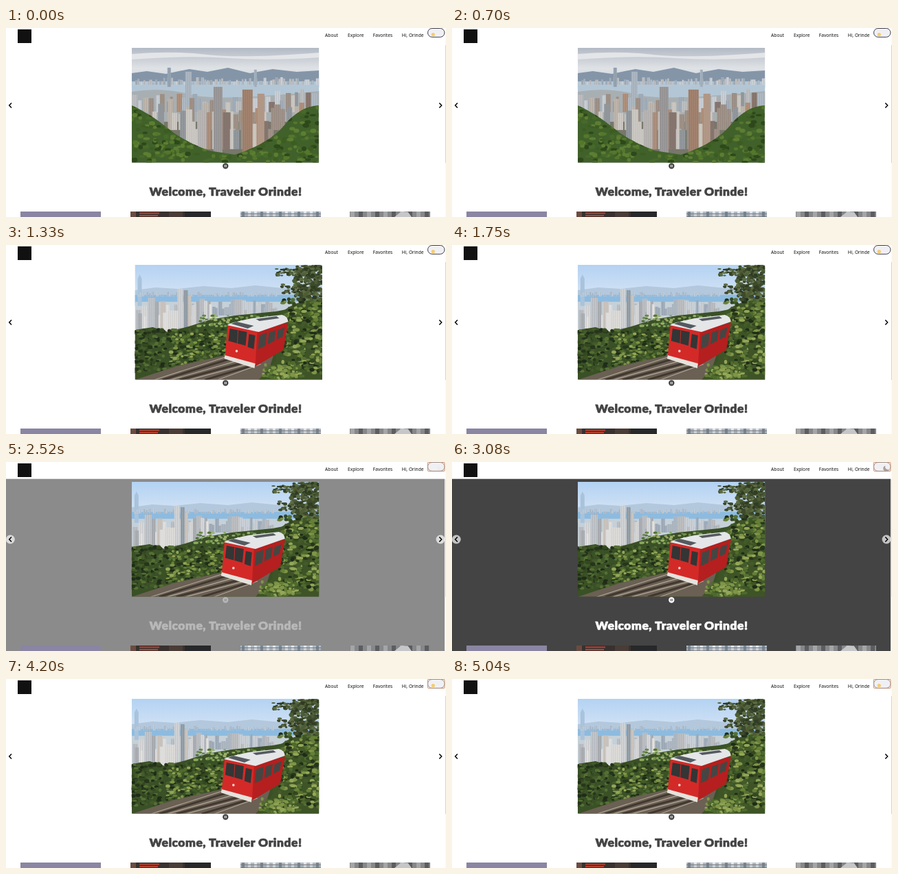
An HTML page for the animation above (5110 ms loop, 640 by 276 pixels).

```html
<!DOCTYPE html>
<html lang="en">
<head>
<meta charset="utf-8">
<title>Travel carousel</title>
<style>
  html, body { margin: 0; height: 100%; overflow: hidden; background: #fff; }
  svg { display: block; width: 100vw; height: 100vh; --bg: #fff; --fg: #444; }
  .bg { fill: var(--bg); }
  .fg { fill: var(--fg); }
  .nav { font: 6.7px "Noto Sans", "Open Sans", sans-serif; fill: #111; }
  .title {
    font: 900 17.4px Lato, sans-serif; letter-spacing: .56px; text-anchor: middle;
    fill: var(--fg); stroke: var(--fg); stroke-width: .7; stroke-linejoin: round;
  }
  .chevron { fill: none; stroke: #000; stroke-width: 1.5; }
</style>
</head>
<body>
<svg viewBox="0 0 640 276" preserveAspectRatio="none">
  <defs>
    <clipPath id="page"><rect width="638" height="276"/></clipPath>
    <clipPath id="frame"><rect width="272.4" height="167.6"/></clipPath>
    <clipPath id="hill"><path d="M0 84Q28 97 52 117T112 150L150 156Q200 140 222 113T272 84V168H0Z"/></clipPath>
    <linearGradient id="cloud" x2="0" y2="1">
      <stop stop-color="#b3bac5"/><stop offset=".18" stop-color="#dfe2e5"/><stop offset=".3" stop-color="#c9d3dd"/>
    </linearGradient>
    <linearGradient id="sky" x2="0" y2="1">
      <stop stop-color="#b3d2f3"/><stop offset="1" stop-color="#dfe9f4"/>
    </linearGradient>
    <pattern id="floors" width="3" height="2" patternUnits="userSpaceOnUse">
      <path d="M0 .5H3M.5 0V2" stroke="#334" stroke-opacity=".2" stroke-width=".6"/>
    </pattern>
  </defs>

  <rect class="bg" width="640" height="276"/>
  <g clip-path="url(#page)">
    <g id="track">
      <g id="city" transform="translate(182.8 28.9)" clip-path="url(#frame)"></g>
      <g id="tram" transform="translate(820.8 28.9)" clip-path="url(#frame)"></g>
    </g>
  </g>

  <g fill="#fff" fill-opacity=".68"><circle cx="6.3" cy="113" r="6.5"/><circle cx="632" cy="113" r="6.5"/></g>
  <path class="chevron" d="M8 109.6L4.7 113L8 116.4M630.3 109.6L633.6 113L630.3 116.4"/>

  <circle class="fg" cx="319.3" cy="201.5" r="4.2"/>
  <path class="bg" d="M317.8 199.8h1v3.4h-1zM319.8 199.8h1v3.4h-1z"/>
  <text class="title" x="319.6" y="244.5">Welcome, Traveler Orinde!</text>
  <g id="cards"></g>

  <rect width="640" height="24.7" fill="#fff"/>
  <rect x="638" width="2" height="276" fill="#fbfbfb"/>
  <rect x="639" y="25" width="1" height="172" fill="#d6d6d6"/>
  <rect x="17" y="2" width="20" height="20" fill="#111"/>
  <g class="nav">
    <text x="464" y="13">About</text>
    <text x="497" y="13">Explore</text>
    <text x="533.7" y="13">Favorites</text>
    <text x="575.7" y="13">Hi, Orinde</text>
  </g>
  <rect id="focus" x="613.4" y=".4" width="24.6" height="13" rx="1" fill="#f7ede6" stroke="#c47a4e" stroke-width=".8"/>
  <rect id="pill" x="613.5" y=".5" width="24.4" height="12.8" rx="6.4" fill="#f0f0f4" stroke-width=".9"/>
  <circle id="sun" cx="621.3" cy="9.5" r="2.6" fill="#f3cd72"/>
  <path id="moon" d="M630.6 5.4A4 4 0 1 0 635 10.6A3.6 3.6 0 0 1 630.6 5.4Z" fill="#a99f96"/>
</svg>

<script>
const LOOP = 5110, STEP = 70, SLIDE = 638;
const el = id => document.getElementById(id);

let seed = 29;
const rand = (a, b) => a + (b - a) * ((seed = seed * 16807 % 2147483647) / 2147483647);
const pick = list => list[Math.floor(rand(0, list.length))];
const rect = (x, y, w, h, fill) => `<rect x="${x}" y="${y}" width="${w}" height="${h}" fill="${fill}"/>`;
const shape = (d, fill) => `<path d="${d}" fill="${fill}"/>`;
const line = (d, stroke, width) => `<path d="${d}" fill="none" stroke="${stroke}" stroke-width="${width}"/>`;
const repeat = (n, make) => Array.from({ length: n }, (_, i) => make(i)).join('');

const tower = (x, y, w, h, fill) => rect(x, y, w, h, fill) + rect(x, y, w, h, 'url(#floors)');
const towers = (n, x0, x1, base, h0, h1, w0, w1, colors) => repeat(n, i => {
  const h = rand(h0, h1);
  return tower(x0 + (x1 - x0) * (i + rand(0, .7)) / n, base - h, rand(w0, w1), h, pick(colors));
});
const leaves = (n, x0, x1, y0, y1, r, colors) => repeat(n, () =>
  `<ellipse cx="${rand(x0, x1)}" cy="${rand(y0, y1)}" rx="${rand(r / 2, r)}" ry="${rand(r / 3, r * .7)}" fill="${pick(colors)}"/>`);

const haze = ['#b8c3cd', '#d5dbe0', '#a9b7c3', '#c7c9ca'];
const stone = ['#c9c0b4', '#a8998c', '#8d7c72', '#d8d4cd', '#9aa0a3', '#b8977f'];
const green = ['#3c5d22', '#54772c', '#47692a', '#2d481a', '#5d7d33'];

el('city').innerHTML =
  rect(0, 0, 273, 168, 'url(#cloud)') +
  shape('M0 9Q60 4 110 10T273 7V14Q200 19 140 15T0 17Z', '#e4e5e8') +
  shape('M0 37L22 34L50 38L84 31L110 35L140 29L172 37L205 31L240 35L273 33V58H0Z', '#8495a8') +
  rect(0, 49, 273, 40, '#b3c6d5') +
  towers(65, 0, 270, 54, 3, 11, 2, 5, haze) +
  tower(52, 29, 5, 28, '#9eacba') + tower(178, 32, 4, 25, '#aebbc7') +
  shape('M0 64Q45 57 85 68T273 63V110H0Z', '#a8afb2') +
  rect(0, 108, 273, 60, '#77776a') +
  towers(34, 0, 268, 94, 14, 34, 4, 9, haze.concat(stone)) +
  tower(78, 35, 9, 55, '#b5c1cb') +
  towers(26, 20, 250, 120, 22, 48, 6, 10, stone) +
  towers(17, 66, 205, 148, 28, 60, 7, 11, stone) +
  tower(119, 57, 13, 97, '#a3a09f') + tower(161, 61, 15, 98, '#a98872') +
  tower(183, 67, 10, 80, '#bea18c') + tower(96, 91, 13, 56, '#c2bfbb') +
  `<g clip-path="url(#hill)">${rect(0, 80, 273, 88, '#41612a') + leaves(420, 0, 273, 82, 168, 5, green)}</g>`;

const shade = ['#26351b', '#33481f', '#435a2b', '#1f2c17', '#557034'];
const bough = ['#3d4a2b', '#4d5c35', '#2f3b22', '#5d6b42'];
const sunny = ['#7f9547', '#94a658', '#667f38', '#4f6a2d'];
el('tram').innerHTML =
  rect(0, 0, 273, 60, 'url(#sky)') +
  shape('M0 37L30 33L62 35L100 31L140 34L175 30L215 34L273 31V60H0Z', '#b3c8dc') +
  rect(0, 44, 273, 12, '#8dbbe0') +
  rect(0, 54, 273, 40, '#c5d0d8') +
  shape('M4 60V20L7 14L10 20V60Z', '#a9c3dc') +
  towers(42, 0, 205, 46, 2, 7, 2, 4, ['#c9d6e2', '#b9c9d8']) +
  towers(32, 80, 205, 74, 8, 24, 3, 7, haze) +
  towers(28, 0, 112, 98, 22, 54, 4, 8, ['#e3e4e3', '#c7cbce', '#b5b9bc', '#d8d1c8', '#f0efec']) +
  tower(62, 35, 8, 57, '#dcdedf') + tower(71, 37, 6, 55, '#9da8b1') +
  tower(19, 48, 10, 46, '#cbd0d4') + tower(48, 67, 15, 28, '#e9e8e4') +
  shape('M0 95L26 91L48 98L78 90L110 80L145 74L205 68L273 55V168H0Z', '#3a5026') +
  leaves(420, 0, 140, 94, 158, 4, shade) +
  leaves(110, 50, 135, 100, 150, 3.5, sunny) +
  leaves(90, 92, 205, 74, 90, 3, ['#71924b', '#86a65a', '#52733a', '#9db06a']) +
  shape('M0 168L60 148L132 132L205 122L190 168H0Z', '#6a6053') +
  line('M28 168L137 133M52 168L150 140M79 168L165 145M120 168L183 145', '#b5aa9c', 1.1) +
  line('M40 168L143 136M65 168L158 143M102 168L175 146', '#40372f', 3) +
  shape('M205 78Q228 50 273 50V168H180L205 140Z', '#3e5426') +
  leaves(300, 215, 273, 50, 164, 4.5, shade.concat(sunny)) +
  leaves(210, 232, 273, 2, 52, 4, bough) +
  leaves(60, 205, 248, 6, 16, 3, bough) +
  leaves(35, 212, 250, 28, 42, 3, bough) +
  leaves(70, 184, 240, 146, 168, 4, sunny) +
  // tram: side, front, roof, glazing, bumper
  shape('M176 97L223 84L216 124L174 149Z', '#b51f1f') +
  shape('M135 88L178 97L175 149L131 134Z', '#d32a28') +
  shape('M134 88Q140 84 170 78L214 73Q222 75 223 83L180 98Z', '#e4e6e8') +
  shape('M140 86L164 93L173 89L148 83ZM176 79L206 75L210 78L181 82Z', '#555b60') +
  shape('M138 93L163 98L161 118L136 111ZM166 101L175 103L173 123L164 120Z', '#343535') +
  shape('M181 103L192 99L190 118L179 123ZM195 99L205 95L203 111L193 116ZM208 95L218 91L215 105L206 109Z', '#454643') +
  line('M150 96L149 115', '#d32a28', .9) +
  shape('M131 132L175 144L174 151L130 137Z', '#e6e2dc') +
  '<circle cx="148" cy="126" r="1.8" fill="#f0d9cc"/>';

el('cards').innerHTML =
  rect(21, 268, 117, 8, '#8a85a2') +
  rect(181, 268, 117, 8, '#39312f') + rect(181, 268, 8, 8, '#6b4b40') + rect(237, 268, 20, 8, '#4a3c36') +
  line('M194 270.5H223M194 274H221', '#b8402f', 2.2) + rect(260, 268, 38, 8, '#262829') +
  rect(341, 268, 117, 8, '#aeb9c4') +
  repeat(13, i => rect(343 + i * 9, 268, 4, 8, i % 3 ? '#e0e2e4' : '#7a8792')) +
  line('M341 271.5H458M341 275H458', '#6f7176', 1) +
  rect(500, 268, 117, 8, '#858789') +
  repeat(10, i => rect(501 + i * 12, 268, 6, 8, i % 2 ? '#5b5d61' : '#a3a5a7')) +
  shape('M565 276L575 268L585 269L590 276Z', '#c5c6c7');

// Same curve as CSS cubic-bezier(), solved by bisection.
const bezier = (x1, y1, x2, y2) => x => {
  if (x <= 0) return 0;
  if (x >= 1) return 1;
  const at = (s, a, b) => 3 * s * (1 - s) ** 2 * a + 3 * s * s * (1 - s) * b + s ** 3;
  let lo = 0, hi = 1;
  for (let i = 0; i < 24; i++) {
    const mid = (lo + hi) / 2;
    at(mid, x1, x2) < x ? lo = mid : hi = mid;
  }
  return at(lo, y1, y2);
};
const ease = bezier(.25, .1, .25, 1);
const easeInOut = bezier(.42, 0, .58, 1);
const gray = v => `rgb(${v},${v},${v})`;
const svg = document.querySelector('svg');

function draw(now) {
  const t = Math.floor(now % LOOP / STEP) * STEP;
  const shift = SLIDE * easeInOut((t - 720) / 650);
  const dark = ease((t - 2340) / 500) - ease((t - 3635) / 500);
  const focused = t >= 2310;

  el('track').setAttribute('transform', `translate(${-shift} 0)`);
  svg.style.setProperty('--bg', gray(Math.round(255 - 187 * dark)));
  svg.style.setProperty('--fg', gray(Math.round(68 + 187 * dark)));
  el('focus').style.opacity = focused ? 1 : 0;
  el('pill').style.stroke = focused ? '#9a8a84' : '#2c2c3a';
  el('sun').style.opacity = Math.max(0, 1 - 2.5 * dark);
  el('moon').style.opacity = Math.max(0, 2.5 * dark - 1.5);
  requestAnimationFrame(draw);
}
requestAnimationFrame(draw);
</script>
</body>
</html>
```
